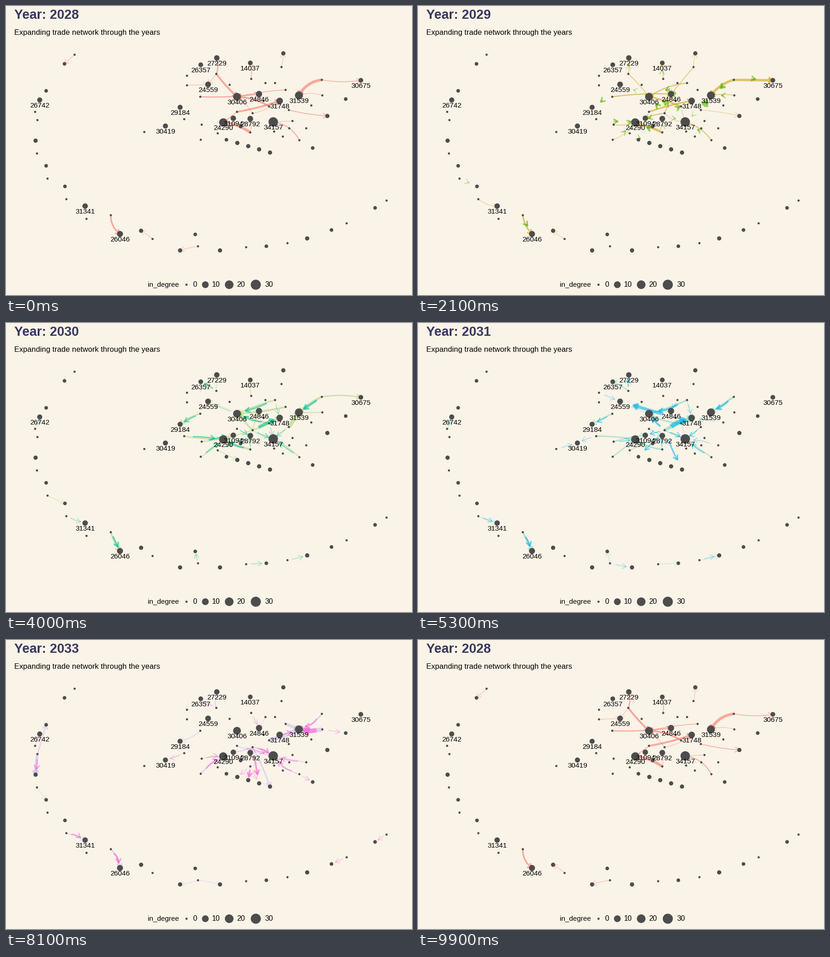
Animation of 885 by 632 pixels, one loop 10000 ms. Source, as a matplotlib script:

```python
import numpy as np
import matplotlib.pyplot as plt
from matplotlib.animation import FuncAnimation
from matplotlib.collections import LineCollection

W, H, DPI = 885, 632, 100
PT = 72 / DPI
BG, NODE, TITLE = "#FAF3E7", "#4D4D4D", "#383862"
COLORS = ["#F8766D", "#C49A00", "#53B400", "#00C094", "#00B6EB", "#A58AFF", "#FB61D7"]
YEAR0 = 2028
ALPHA = 0.6
BEND = 0.085     # fan spread per parallel edge, relative to its length
HEAD = 11        # arrowhead barb length
STARTS = [6, 21, 36, 50, 64, 78, 92]
STEPS = [9, 9, 9, 8, 8, 8, 8]

plt.rcParams["font.family"] = "Liberation Sans"

# Importing hubs, named by their number
nodes = {
    26742: (73, 205), 27229: (459, 113), 26357: (424, 128), 14037: (532, 124),
    30675: (773, 162), 24559: (440, 171), 30406: (503, 198), 24846: (551, 192),
    31748: (596, 207), 31539: (638, 195), 29184: (379, 221), 30419: (347, 262),
    24290: (473, 254), 31094: (495, 245), 28792: (532, 246), 34157: (582, 253),
    26046: (248, 498),
}
# Traders around the hubs
core = [
    (149, 106), (394, 152), (394, 173), (458, 148), (423, 198), (487, 172),
    (534, 159), (565, 168), (586, 168), (609, 183), (600, 133), (688, 161),
    (689, 195), (665, 217), (573, 219), (616, 227), (624, 251), (617, 267),
    (654, 267), (639, 293), (603, 285), (584, 274), (537, 234), (503, 231),
    (426, 259), (424, 292), (461, 278), (388, 247), (301, 275), (532, 276),
    (63, 231), (68, 249), (561, 207), (127, 126), (87, 185), (604, 103),
    (740, 203), (700, 240), (668, 310), (511, 263),
]
nodes.update(enumerate(core))

# South-western steps: each importer has an exporter just below it
west = {"w0": (64, 294), "w1": (87, 349), "w2": (128, 394), 31341: (172, 437)}
nodes.update(west)
nodes.update({f"v{i}": (x + 3, y + 28) for i, (x, y) in enumerate(west.values())})

south = [(228, 457), (319, 509), (418, 525), (294, 491), (412, 499), (379, 534), (466, 534)]
nodes.update({f"s{i}": p for i, p in enumerate(south)})

# South-eastern parabola and the short row under the core
for i, x in enumerate([523, 567, 613, 656, 709, 742, 804, 829]):
    nodes[f"e{i}"] = (x, 527 - 102 * ((x - 523) / 306) ** 2)
for i, u in enumerate(np.linspace(0, 1, 5)):
    nodes[f"a{i}"] = (480 + 95 * u, 292 + 28 * u)

pairs = {}
degree = dict.fromkeys(nodes, 0)


def into(dst, *routes):
    """Each route: exporter, first year, last year, first and last line width."""
    for src, first, *rest in routes:
        last = rest[0] if rest else first
        w0 = rest[1] if len(rest) > 1 else 0.9
        w1 = rest[2] if len(rest) > 2 else w0
        span = range(first - 28, last - 27)
        pairs.setdefault((src, dst), {}).update(zip(span, np.linspace(w0, w1, len(span))))
        degree[dst] += len(span)


into(27229, (3, 28, 30, 2.4, 0.9), (3, 32, 33, 2))
into(26357, (3, 31, 31, 2.3), (3, 33, 34))
into(14037, (6, 28, 30, 1.5))
into(30675, (11, 28, 28, 1.5), (11, 29, 30, 5.3, 3))
into(24559, (2, 28), (3, 28), (30406, 30, 31), (32, 32, 32, 6.5), (1, 32))
into(24846, (4, 28, 29, 2.4), (10, 29, 29, 1.5), (22, 29, 30, 2), (7, 32, 33), (6, 34))
into(30406, (3, 28, 29, 4, 1.5), (14, 28, 31, 4, 3), (9, 28, 28, 1.5), (9, 30, 30, 4),
     (22, 28), (22, 30, 30, 4), (22, 32, 32, 4), (8, 29, 32, 2.3, 4))
into(31748, (23, 28, 29, 4, 3.5), (22, 28), (22, 30, 32, 3.5, 10), (8, 31, 32), (13, 32))
into(31539, (11, 28, 34, 6, 2.6), (12, 28, 30, 0.9, 2), (12, 33, 34, 9.5),
     (15, 30, 30, 9), (9, 33, 33, 6), (14, 33, 34, 9, 2))
into(29184, (4, 30, 33, 3, 1.5))
into(30419, (27, 32, 34), (28, 32))
into(24290, (23, 28, 28, 1.5), (29, 28, 31, 6, 3.5), (25, 29, 31, 0.9, 2.3),
     (25, 33, 34, 2.6), (24, 29, 29, 1.5), (24, 32, 34, 1.5), (22, 30, 30, 2.2),
     (27, 30, 31, 2.7))
into(31094, (24, 30, 31, 2.7), (22, 29, 29, 2.3), (22, 32, 33, 2))
into(28792, (29, 28), (29, 30, 32, 1.2), (23, 31, 31, 1.5), (26, 31, 31, 1.5))
into(34157, (16, 28), (19, 28, 34, 2), (14, 29), (14, 31), (22, 29, 34, 0.9, 2.8),
     (15, 30, 32, 0.9, 1.8), (18, 32, 34, 0.9, 2), (23, 33, 34, 1.8), (29, 33))
into(31341, ("v2", 29), ("v2", 31, 34, 0.9, 2.3))
into(26046, ("s0", 28, 34, 3.4))
into(26742, (30, 31, 34))

into(33, (0, 28))
into(34, (31, 33, 33, 2.5))
into(35, (10, 28, 29))
into(36, (12, 34))
into(37, (15, 28, 29, 1.6, 0.9))
into(38, (19, 34))
into(39, (22, 33))
into("w0", (31, 33, 34, 6, 2.8))
into("w1", ("v0", 33))
into("w2", ("v1", 30))
into("s3", ("s1", 28, 29))
into("s4", ("s2", 31))
into("s5", ("s2", 28), ("s2", 33))
into("s6", ("s2", 32, 33))
into("e1", ("e0", 31))
into("e3", ("e2", 31, 32))
into("e4", ("e5", 34))
into("e6", ("e7", 34))
into("a0", (22, 32, 32, 2.2))
into("a1", (26, 30, 30, 1.5), (29, 34))
into("a2", (29, 33, 34, 0.9, 3.7))
into("a3", (22, 34, 34, 3.7), (29, 34))
into("a4", (22, 32, 33, 3))


def radius(deg):
    return 2.4 + 1.57 * np.sqrt(deg)


def fan(a, b, offset):
    """Quadratic curve from a to b, bulging to the right of travel."""
    t = np.linspace(0, 1, 25)[:, None]
    d = b - a
    mid = (a + b) / 2 + offset * BEND * np.array([-d[1], d[0]])
    return (1 - t) ** 2 * a + 2 * t * (1 - t) * mid + t ** 2 * b


def arrowhead(path):
    tip = path[-1]
    back = path[-2] - tip
    ang = np.arctan2(back[1], back[0])
    barb = [tip + HEAD * np.array([np.cos(ang + s), np.sin(ang + s)])
            for s in (-np.pi / 6, np.pi / 6)]
    return np.array([barb[0], tip, barb[1]])


edges = [[] for _ in COLORS]
for (src, dst), widths in pairs.items():
    a, b = (np.array(nodes[n], float) for n in (src, dst))
    for i, year in enumerate(sorted(widths)):
        edges[year].append((fan(a, b, (len(widths) - 1) / 2 - i), widths[year]))


def segments(year, grow):
    out = []
    for path, _ in edges[year]:
        mid = path.mean(axis=0)
        path = mid + grow * (path - mid)
        out += [path, arrowhead(path)]
    return out


fig = plt.figure(figsize=(W / DPI, H / DPI), dpi=DPI, facecolor=BG)
ax = fig.add_axes([0, 0, 1, 1])
ax.set_xlim(-0.5, W - 0.5)
ax.set_ylim(H - 0.5, -0.5)
ax.axis("off")


def dots(points, deg):
    x, y = np.array(points).T
    ax.scatter(x, y, s=(2 * radius(np.array(deg)) * PT) ** 2, c=NODE, linewidths=0, zorder=3)


def label(x, y, s, px, **kw):
    return ax.text(x, y, s, fontsize=px * PT, va="baseline", zorder=5, **kw)


layers = []
for year, color in enumerate(COLORS):
    lw = np.repeat([w * PT for _, w in edges[year]], 2)
    layer = LineCollection(segments(year, 1), colors=color, linewidths=lw, zorder=2)
    layer.set_joinstyle("round")
    layers.append(ax.add_collection(layer, autolim=False))

dots(list(nodes.values()), list(degree.values()))
for name, (x, y) in nodes.items():
    if degree[name] >= 3:
        label(x, y + 16.6, str(name), 15.4, ha="center")

title = label(17, 28, "", 28.5, color=TITLE, weight="bold")
label(17, 63, "Expanding trade network through the years", 16.45)
label(308.5, 613.6, "in_degree", 15.3)
for deg, x, tx in [(0, 392, 407), (10, 433, 448), (20, 485.5, 502.5), (30, 543, 563.5)]:
    dots([(x, 608)], [deg])
    label(tx, 613.6, str(deg), 16)


def update(frame):
    cur, step, n = 0, 0, 1
    for i, (start, steps) in enumerate(zip(STARTS, STEPS)):
        if frame >= start:
            cur, step, n = i, min(frame - start + 1, steps), steps
    p = step / n
    nxt = (cur + 1) % len(COLORS)
    for year, layer in enumerate(layers):
        entering = year == nxt and p > 0
        layer.set_visible(entering or (year == cur and p < 1))
        if entering:
            layer.set_segments(segments(year, p))
            layer.set_alpha(ALPHA)
        elif year == cur:
            layer.set_segments(segments(year, 1))
            layer.set_alpha(ALPHA * (1 - p))
    closest = nxt if step > (n + 1) // 2 else cur
    title.set_text(f"Year: {YEAR0 + closest}")
    return layers + [title]


anim = FuncAnimation(fig, update, frames=100, interval=100, repeat=True, blit=False)
plt.show()
```
